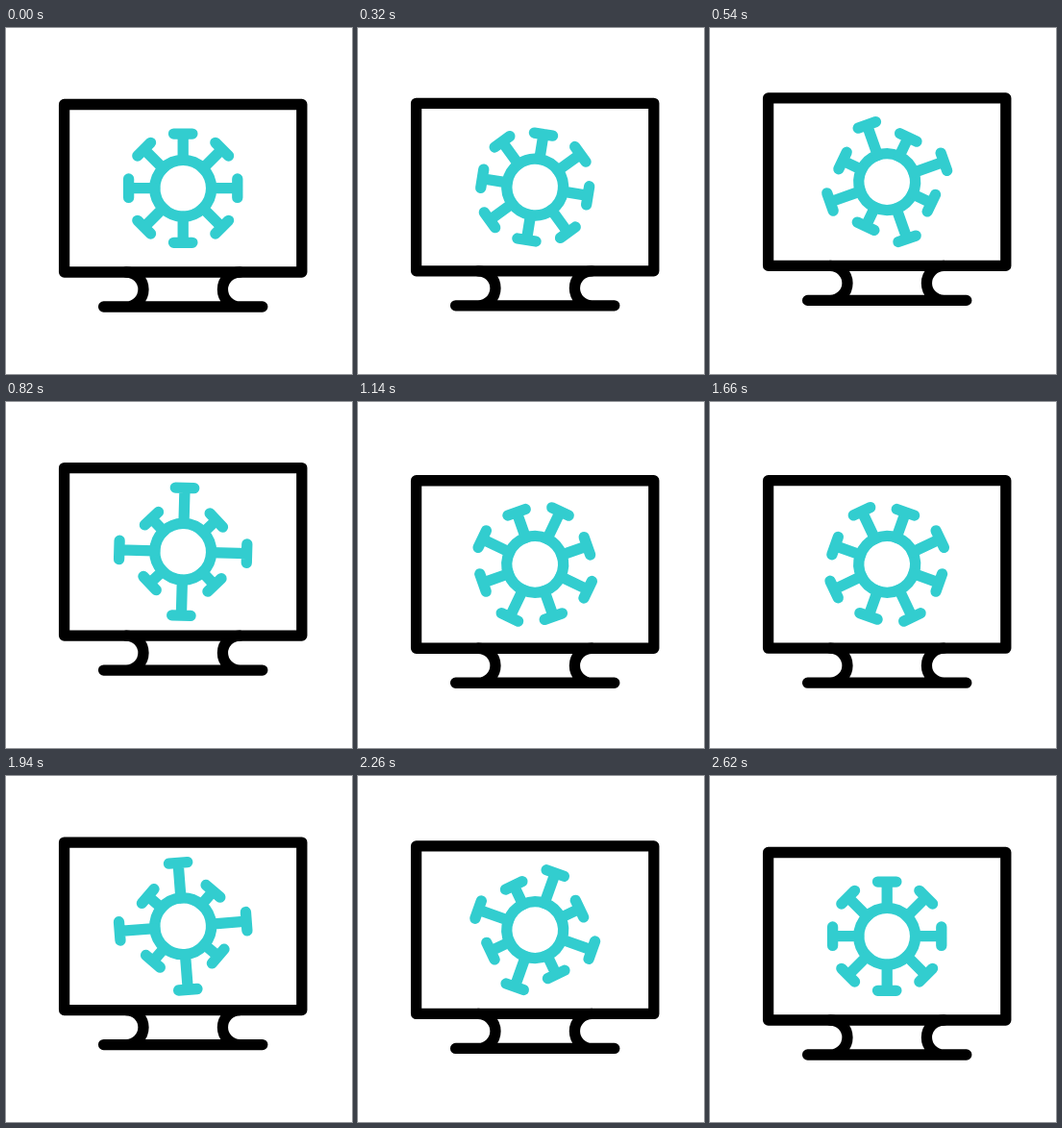
Animation, 360 px wide and 360 px high, one loop 2.82 s. Source, as an HTML page:

```html
<!DOCTYPE html>
<html lang="en">
<head>
<meta charset="utf-8">
<title>Virus on a monitor</title>
<style>
  html, body { margin: 0; width: 100%; height: 100%; overflow: hidden; background: #fff; }
  svg { display: block; width: 100%; height: 100%; }
  g { fill: none; stroke-width: 11.3; stroke-linecap: round; stroke-linejoin: round; }
  #scene { stroke: #000; }
  #virus { stroke: #32cdcf; }
</style>
</head>
<body>
<svg viewBox="0 0 360 360">
  <g id="scene">
    <rect x="60.6" y="79.5" width="247.2" height="174.5"/>
    <path d="M125 254a18 18 0 0 1 0 36M243.4 254a18 18 0 0 0 0 36M101.6 290H266.8"/>
    <g id="virus">
      <circle r="29.4"/>
      <path id="straight"/>
      <path id="diagonal"/>
    </g>
  </g>
</svg>
<script>
const LOOP = 2820, START = 200, STEP = 600, TURN = 180;
const CAP = 9.7, RING = 29.4;
const [scene, virus, straight, diagonal] =
  ['scene', 'virus', 'straight', 'diagonal'].map(id => document.getElementById(id));

// Values at START and every STEP after it
const bob = [0, -11, 11, -11, 0];
const straightReach = [56.6, 47.6, 64, 47.6, 56.6];
const diagonalReach = [57.3, 66.4, 57.3, 66.4, 57.3];

const smooth = u => u * u * (3 - 2 * u);

function sample(keys, pos) {
  const i = Math.min(Math.floor(pos), keys.length - 2);
  return keys[i] + (keys[i + 1] - keys[i]) * smooth(pos - i);
}

// Four T-shaped spikes, a quarter turn apart
function spikes(reach, first) {
  let d = '';
  for (let k = 0; k < 4; k++) {
    const a = (first + k * 90) * Math.PI / 180;
    const at = (r, side) =>
      (r * Math.sin(a) + side * Math.cos(a)).toFixed(2) + ' ' +
      (side * Math.sin(a) - r * Math.cos(a)).toFixed(2);
    d += `M${at(RING, 0)}L${at(reach, 0)}M${at(reach, -CAP)}L${at(reach, CAP)}`;
  }
  return d;
}

function draw(time) {
  const pos = Math.min(Math.max((time % LOOP - START) / STEP, 0), 4);
  scene.setAttribute('transform', `translate(0 ${sample(bob, pos)})`);
  virus.setAttribute('transform', `translate(184.2 166.7) rotate(${TURN * pos / 4})`);
  straight.setAttribute('d', spikes(sample(straightReach, pos), 0));
  diagonal.setAttribute('d', spikes(sample(diagonalReach, pos), 45));
}

const begin = performance.now();
function tick() {
  draw(performance.now() - begin);
  requestAnimationFrame(tick);
}
tick();
</script>
</body>
</html>
```
